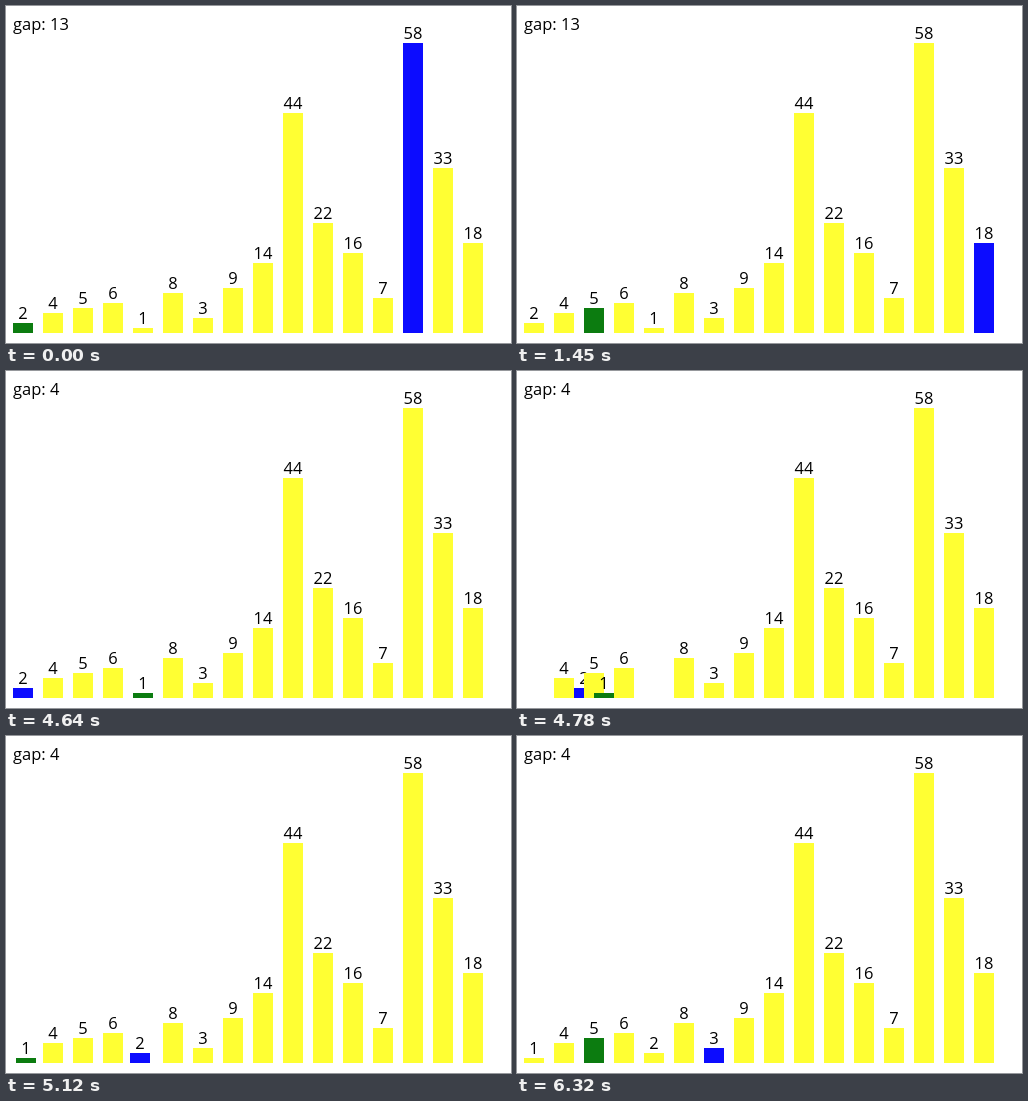
These frames come from a looping animation (505x337 px, 8 s). An HTML page:

```html
<!DOCTYPE html>
<html lang="en">
<head>
<meta charset="utf-8">
<title>Shell sort</title>
<style>
  html, body { margin: 0; width: 100%; height: 100%; overflow: hidden; background: #fff; }
  svg {
    display: block;
    --low: #0c7c10;
    --high: #0c0cff;
    font: 16.5px "Open Sans", "Noto Sans", sans-serif;
  }
  rect { fill: #ffff33; shape-rendering: crispEdges; }
  .bar text { text-anchor: middle; }
  .bar, rect, .gap { animation: 8s step-end infinite; }

  /* Compared pairs: low index and high index of each step */
  #b0 rect { animation-name: swap-low; }
  #b4 rect { animation-name: swap-high; }
  #b13 rect { animation-name: high-1; }
  #b1 rect { animation-name: low-2; }
  #b14 rect { animation-name: high-2; }
  #b2 rect { animation-name: low-3; }
  #b15 rect { animation-name: high-3; }
  #b5 rect { animation-name: high-5; }
  #b6 rect { animation-name: high-6; }

  @keyframes swap-low {
    0%, 28% { fill: var(--low); }
    8.25%, 68.25%, 100% { fill: #ffff33; }
    58% { fill: var(--high); }
  }
  @keyframes swap-high {
    0%, 68.25%, 100% { fill: #ffff33; }
    28% { fill: var(--high); }
    58% { fill: var(--low); }
  }
  @keyframes high-1 {
    0% { fill: var(--high); }
    8.25%, 100% { fill: #ffff33; }
  }
  @keyframes low-2 {
    0%, 18.125%, 79%, 100% { fill: #ffff33; }
    8.25%, 68.25% { fill: var(--low); }
  }
  @keyframes high-2 {
    0%, 18.125%, 100% { fill: #ffff33; }
    8.25% { fill: var(--high); }
  }
  @keyframes low-3 {
    0%, 28% { fill: #ffff33; }
    18.125%, 79%, 100% { fill: var(--low); }
  }
  @keyframes high-3 {
    0%, 28%, 100% { fill: #ffff33; }
    18.125% { fill: var(--high); }
  }
  @keyframes high-5 {
    0%, 79%, 100% { fill: #ffff33; }
    68.25% { fill: var(--high); }
  }
  @keyframes high-6 {
    0% { fill: #ffff33; }
    79%, 100% { fill: var(--high); }
  }

  /* Eased exchange, advancing every 70 ms */
  #b0 { --dir: 1px; animation-name: swap; }
  #b4 { --dir: -1px; animation-name: swap; }
  @keyframes swap {
    0%, 58% { transform: translateX(0); }
    58.875% { transform: translateX(calc(14 * var(--dir))); }
    59.75% { transform: translateX(calc(50 * var(--dir))); }
    60.625% { transform: translateX(calc(81 * var(--dir))); }
    61.5% { transform: translateX(calc(100 * var(--dir))); }
    62.375% { transform: translateX(calc(111 * var(--dir))); }
    63.25% { transform: translateX(calc(117 * var(--dir))); }
    64.125% { transform: translateX(calc(119 * var(--dir))); }
    64.875%, 100% { transform: translateX(calc(120 * var(--dir))); }
  }

  .wide { animation-name: wide; }
  .narrow { animation-name: narrow; }
  @keyframes wide {
    0% { opacity: 1; }
    28%, 100% { opacity: 0; }
  }
  @keyframes narrow {
    0% { opacity: 0; }
    28%, 100% { opacity: 1; }
  }
</style>
</head>
<body>
<svg id="chart" width="505" height="337" viewBox="0 0 505 337"></svg>
<script>
  const values = [2, 4, 5, 6, 1, 8, 3, 9, 14, 44, 22, 16, 7, 58, 33, 18];
  const base = 327, unit = 5, pitch = 30;

  const bar = (value, i) => {
    const x = 7 + i * pitch, h = value * unit, y = base - h;
    return `<g class="bar" id="b${i}">
      <rect x="${x}" y="${y}" width="20" height="${h}"/>
      <text x="${x + 10}" y="${y - 4}">${value}</text>
    </g>`;
  };
  const gap = (name, n) => `<text class="gap ${name}" x="7" y="24">gap: ${n}</text>`;

  document.getElementById("chart").innerHTML =
    gap("wide", 13) + gap("narrow", 4) + values.map(bar).join("");
</script>
</body>
</html>
```
